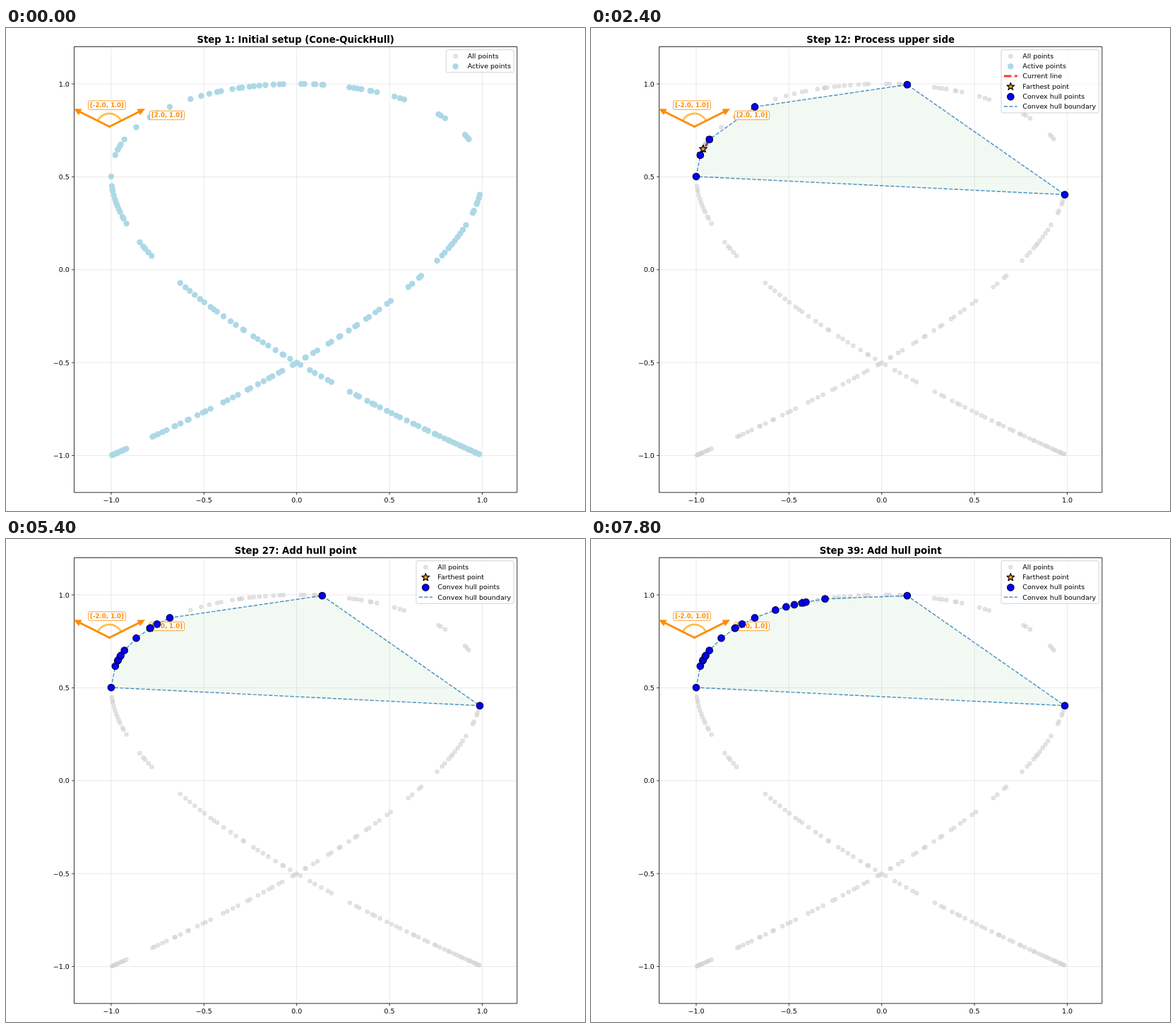
These frames come from a looping animation (820x683 px, 8 s). An HTML page with a canvas:

```html
<!DOCTYPE html>
<html lang="en">
<head>
<meta charset="utf-8">
<title>Cone-QuickHull</title>
<style>
html, body { margin: 0; width: 100%; height: 100%; overflow: hidden; background: #fff; }
canvas { display: block; width: 820px; height: 683px; }
</style>
</head>
<body>
<canvas id="stage" width="820" height="683"></canvas>
<script>
const ctx = document.getElementById('stage').getContext('2d');
const PT = 0.949;                      // pixels per point
const X0 = 411.7, Y0 = 341.8, UNIT = 262.75;
const BOX = { l: 96.5, t: 26.5, r: 723.8, b: 656.8 };
const STEP_MS = 200, LOOP_MS = 8000;
const SANS = '"DejaVu Sans", Verdana, sans-serif';
const ORANGE = '#ff8c00';

// Every point lies on the curve (sin 3t, cos 2t).
const px = t => X0 + UNIT * Math.sin(3 * t);
const py = t => Y0 - UNIT * Math.cos(2 * t);
const onArc = x => Math.asin((x - X0) / UNIT) / 3;

// Leftmost and rightmost point, then the order in which points join the hull.
const ends = [-0.5227, 0.5775];
const added = [447.8, 232, 167.7, 154.8, 158.9, 158.2, 162.6, 161.8, 203.8, 184.5, 214, 204.5,
  331.5, 276.4, 261.3, 304.5, 288, 299].map(onArc);

// Other points are scattered evenly at random over these stretches of t.
const stretches = [
  [-1.51, -1.144], [-1.11, -0.821], [-0.748, -0.711], [-0.66, -0.552],
  [-0.118, -0.024], [0.008, 0.048], [0.096, 0.149], [0.185, 0.206],
  [0.29, 0.309], [0.379, 0.396], [0.588, 0.63], [0.664, 0.761],
  [0.802, 0.832], [0.87, 1.183], [1.208, 1.344], [1.435, 1.538]
];
const DENSITY = 95;

let seed = 7;
function random() {
  seed = (seed * 16807) % 2147483647;
  return seed / 2147483647;
}

function scatter([a, b]) {
  const gaps = Math.ceil((b - a) * DENSITY);
  return Array.from({ length: gaps + 1 }, (_, i) => {
    const wobble = i === 0 || i === gaps ? 0 : random() - 0.5;
    return a + (b - a) * (i + wobble) / gaps;
  });
}

const points = [...ends, ...added, ...stretches.flatMap(scatter)];

function stateAt(step) {
  if (step === 1) return { title: 'Initial setup (Cone-QuickHull)', active: points, hull: [] };
  if (step === 2) return { title: 'Find extreme points', active: points, hull: ends };
  const k = Math.max(0, Math.floor(step / 2) - 2);
  const far = added[k];
  const before = [...ends, ...added.slice(0, k)].sort((a, b) => a - b);
  const a = before.filter(t => t < far).pop();
  const b = before.find(t => t > far);
  const active = points.filter(t => t > a && t < b);
  if (step === 3) return { title: 'Initial line', active, hull: ends, line: ends };
  if (step % 2 === 0) return { title: 'Process upper side', active, hull: before, line: [a, b], far };
  return { title: 'Add hull point', active: [], hull: [...before, far].sort((p, q) => p - q), far };
}

function stroke(color, width, dash = []) {
  ctx.strokeStyle = color;
  ctx.lineWidth = width * PT;
  ctx.setLineDash(dash.map(d => d * width * PT));
  ctx.stroke();
  ctx.setLineDash([]);
}

function fill(color) {
  ctx.fillStyle = color;
  ctx.fill();
}

function polyline(list, closed) {
  ctx.beginPath();
  list.forEach(([x, y]) => ctx.lineTo(x, y));
  if (closed) ctx.closePath();
}

function disc(x, y, r) {
  ctx.beginPath();
  ctx.arc(x, y, r, 0, 2 * Math.PI);
}

function text(str, x, y, size, align, color = '#000', weight = '') {
  ctx.font = `${weight} ${size * PT}px ${SANS}`;
  ctx.textAlign = align;
  ctx.fillStyle = color;
  ctx.fillText(str, x, y);
}

function grayDot(x, y) {
  disc(x, y, 2.6);
  fill('rgba(211,211,211,0.6)');
  stroke('rgba(211,211,211,0.6)', 1.5);
}

function activeDot(x, y) {
  disc(x, y, 4.2);
  fill('#add8e6');
}

function hullDot(x, y) {
  disc(x, y, 4.75);
  fill('#00f');
  stroke('#00004a', 1.3);
}

function star(x, y) {
  const tips = Array.from({ length: 10 }, (_, i) => {
    const r = i % 2 ? 2.22 : 5.81, a = i * Math.PI / 5;
    return [x + r * Math.sin(a), y - r * Math.cos(a)];
  });
  polyline(tips, true);
  fill('#ffa52a');
  ctx.lineJoin = 'bevel';
  stroke('#000', 1.3);
  ctx.lineJoin = 'miter';
}

const DASH = [3.7, 1.6];
const hullLine = () => stroke('rgba(31,119,180,0.8)', 1.5, DASH);
const currentLine = () => stroke('rgba(255,0,0,0.8)', 3, DASH);

function eachTick(draw) {
  for (let v = -1; v <= 1; v += 0.5) draw(X0 + v * UNIT, Y0 - v * UNIT, v);
}

function grid() {
  eachTick((x, y) => {
    polyline([[x, BOX.t], [x, BOX.b]]);
    stroke('rgba(176,176,176,0.33)', 0.9);
    polyline([[BOX.l, y], [BOX.r, y]]);
    stroke('rgba(176,176,176,0.33)', 0.9);
  });
}

function frameAndTicks() {
  ctx.beginPath();
  ctx.rect(BOX.l, BOX.t, BOX.r - BOX.l, BOX.b - BOX.t);
  stroke('#000', 0.85);
  eachTick((x, y, v) => {
    const label = v.toFixed(1).replace('-', '\u2212');
    polyline([[x, BOX.b], [x, BOX.b + 3.4]]);
    stroke('#000', 0.8);
    polyline([[BOX.l, y], [BOX.l - 3.4, y]]);
    stroke('#000', 0.8);
    text(label, x, 670.7, 10, 'center');
    text(label, 89.8, y + 3.5, 10, 'right');
  });
}

function tag(str, x, y, w) {
  ctx.beginPath();
  ctx.roundRect(x - w / 2, y - 6.2, w, 12.4, 2);
  fill('rgba(255,255,255,0.85)');
  stroke('rgba(255,140,0,0.85)', 1);
  text(str, x, y + 2.9, 9, 'center', ORANGE, 'bold');
}

function cone() {
  const ax = 146.5, ay = 139.5, tilt = Math.atan2(1, 2);
  ctx.beginPath();
  ctx.arc(ax, ay, 18.5, Math.PI + tilt, -tilt);
  stroke('rgba(255,165,0,0.7)', 3);
  for (const side of [-1, 1]) {
    const tx = ax + side * 50.6, ty = ay - 25.3;
    const ux = side * Math.cos(tilt), uy = -Math.sin(tilt);
    const at = (back, off) => [tx - ux * back - uy * off, ty - uy * back + ux * off];
    ctx.lineCap = 'round';
    polyline([[ax, ay], at(8, 0)]);
    stroke(ORANGE, 3);
    ctx.lineCap = 'butt';
    polyline([[tx, ty], at(10.5, 4.8), at(10.5, -4.8)], true);
    fill(ORANGE);
  }
  tag('[-2.0, 1.0]', 143, 109.1, 52.8);
  tag('[2.0, 1.0]', 228, 123.5, 49.2);
}

function legend(s) {
  const marker = draw => (x, y) => draw(x, y + 0.6);
  const dashes = draw => (x, y) => {
    polyline([[x - 10 * PT, y], [x + 10 * PT, y]]);
    draw();
  };
  const rows = [['All points', marker(grayDot)]];
  if (s.active.length) rows.push(['Active points', marker(activeDot)]);
  if (s.line) rows.push(['Current line', dashes(currentLine)]);
  if (s.far !== undefined) rows.push(['Farthest point', marker(star)]);
  if (s.hull.length) rows.push(['Convex hull points', marker(hullDot)]);
  if (s.hull.length > 2) rows.push(['Convex hull boundary', dashes(hullLine)]);

  ctx.font = `${10 * PT}px ${SANS}`;
  const wide = Math.max(...rows.map(r => ctx.measureText(r[0]).width));
  const right = 719, left = right - wide - 36 * PT;
  ctx.beginPath();
  ctx.roundRect(left, 30.8, right - left, 3.2 + rows.length * 14.33, 2);
  fill('rgba(255,255,255,0.8)');
  stroke('rgba(204,204,204,0.9)', 1);
  rows.forEach(([name, mark], i) => {
    const y = 39.3 + i * 14.33;
    mark(left + 14 * PT, y);
    text(name, left + 32 * PT, y + 3.4, 10, 'left');
  });
}

function draw(step) {
  const s = stateAt(step);
  const place = t => [px(t), py(t)];
  const hull = s.hull.map(place);
  const hasArea = hull.length > 2;
  ctx.fillStyle = '#fff';
  ctx.fillRect(0, 0, 820, 683);
  if (hasArea) {
    polyline(hull, true);
    fill('rgba(0,128,0,0.05)');
  }
  grid();
  points.forEach(t => grayDot(...place(t)));
  s.active.forEach(t => activeDot(...place(t)));
  if (hasArea) {
    polyline(hull, true);
    hullLine();
  }
  if (s.line) {
    const pair = s.line.map(place);
    polyline(pair);
    currentLine();
    ctx.fillStyle = '#000';
    pair.forEach(([x, y]) => ctx.fillRect(x - 4.2, y - 4.2, 8.4, 8.4));
  }
  if (s.far !== undefined) star(...place(s.far));
  frameAndTicks();
  cone();
  hull.forEach(p => hullDot(...p));
  legend(s);
  text(`Step ${step}: ${s.title}`, 410.1, 20.8, 14, 'center', '#000', 'bold');
}

let shown = 0;
function tick() {
  const step = Math.max(1, Math.floor(performance.now() % LOOP_MS / STEP_MS));
  if (step !== shown) draw(shown = step);
  requestAnimationFrame(tick);
}
tick();
</script>
</body>
</html>
```
